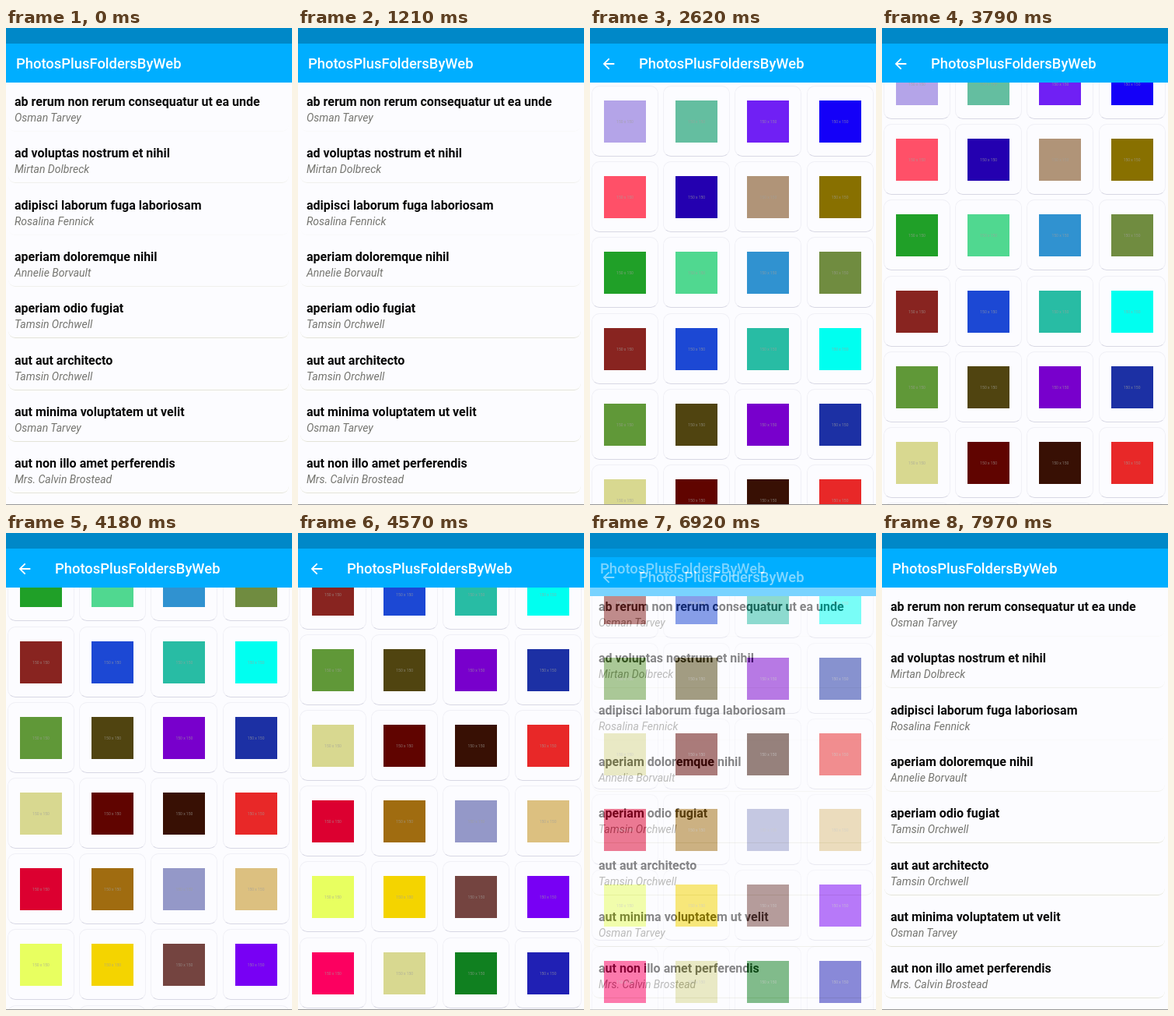
An HTML page for the animation above (8000 ms loop, 368 px wide and 612 px high).

```html
<!DOCTYPE html>
<html lang="en">
<head>
<meta charset="utf-8">
<title>Album browser</title>
<style>
  html, body { margin: 0; width: 100%; height: 100%; overflow: hidden; }
  body { position: relative; font-family: Roboto, "Open Sans", sans-serif; }
  div, svg { position: absolute; box-sizing: border-box; white-space: nowrap; }
  .screen { left: 0; top: 0; width: 368px; height: 612px; overflow: hidden; background: #fcfcff; }
  .status { width: 100%; height: 20px; background: #0088c8; }
  .bar { top: 20px; width: 100%; height: 50px; background: #00aeff; color: #fff;
         font: 500 18.4px/52px Roboto, sans-serif; }
  .bar svg { left: 13px; top: 15px; width: 22px; height: 22px; fill: #fff; }
  .edge { top: 611px; width: 100%; height: 1px; background: #999; }
  .row { left: 3px; width: 361px; height: 62px; border-radius: 9px; border-bottom: 1px solid; }
  .row div { left: 8px; }
  .title { top: 14px; font: 700 16px/20px Roboto, sans-serif; color: #080808; }
  .author { top: 35px; font: italic 14px/18px Roboto, sans-serif; color: #757570; }
  .view { top: 70px; width: 100%; height: 541px; overflow: hidden; }
  .card { width: 86px; height: 91px; border: 1px solid #f0f0f6; border-bottom-color: #d8d8e4;
          border-radius: 10px; background: #fcfcff; }
  .photo { left: 15px; top: 18px; width: 54px; height: 54px; text-align: center;
           font: 5px/54px Roboto, sans-serif; color: rgba(160, 160, 155, .7); }
</style>
</head>
<body>
<div class="screen" id="list"></div>
<div class="screen" id="gallery"></div>
<script>
const LOOP = 8000;
const appName = "PhotosPlusFoldersByWeb";
const albums = [
  ["ab rerum non rerum consequatur ut ea unde", "Osman Tarvey"],
  ["ad voluptas nostrum et nihil", "Mirtan Dolbreck"],
  ["adipisci laborum fuga laboriosam", "Rosalina Fennick"],
  ["aperiam doloremque nihil", "Annelie Borvault"],
  ["aperiam odio fugiat", "Tamsin Orchwell"],
  ["aut aut architecto", "Tamsin Orchwell"],
  ["aut minima voluptatem ut velit", "Osman Tarvey"],
  ["aut non illo amet perferendis", "Mrs. Calvin Brostead"]
];
const colors = `b4a4e8 64bea0 7020f4 1400f8  ff5068 2400b0 b09478 887000
  20a028 50d890 3092d0 708c40  882420 1c48d4 28bca4 00fff0
  609838 504410 7800cc 1c30a4  d8d890 600400 381004 e82828
  dc0030 a06c10 9498c8 dcc080  e8ff60 f4d400 744440 7800f4
  fc0060 d8d890 108020 2020b4`.split(/\s+/);

const list = document.getElementById("list");
const gallery = document.getElementById("gallery");

function add(parent, cls, text = "", style = {}) {
  const el = document.createElement("div");
  el.className = cls;
  el.textContent = text;
  Object.assign(el.style, style);
  return parent.appendChild(el);
}

function addChrome(screen, titleX) {
  add(screen, "status");
  const bar = add(screen, "bar");
  add(bar, "", appName, { left: titleX + "px" });
  add(screen, "edge");
  return bar;
}

addChrome(list, 13);
albums.forEach(([title, author], i) => {
  const line = i > 3 ? "#e4e4d8" : i % 2 ? "#f0f0ec" : "#f9f9fa";
  const row = add(list, "row", "", { top: 71 + i * 66.35 + "px", borderBottomColor: line });
  add(row, "title", title);
  add(row, "author", author);
});

addChrome(gallery, 63).insertAdjacentHTML("beforeend",
  '<svg viewBox="0 0 24 24"><path d="M20 11H7.8l5.6-5.6L12 4l-8 8 8 8 1.4-1.4L7.8 13H20z"/></svg>');
const view = add(gallery, "view");
const grid = add(view, "");
const photos = colors.map((color, i) => {
  const card = add(grid, "card", "", {
    left: 2 + (i % 4) * 92.2 + "px",
    top: 4 + Math.floor(i / 4) * 97.2 + "px"
  });
  return add(card, "photo", "150 x 150", { background: "#" + color });
});

const progress = (t, start, length) => Math.min(1, Math.max(0, (t - start) / length));

// Drag up, steady pull, then coast to rest.
function scrollAt(t) {
  const coast = 1 - progress(t, 4180, 350);
  return 47 * progress(t, 3605, 185) ** 2
    + 198 * progress(t, 3790, 390)
    + 88 * (1 - coast ** 2);
}

function draw(t) {
  const enter = progress(t, 1650, 350);
  const leave = progress(t, 6800, 250);
  const shift = 49 * ((1 - enter) ** 2 + leave ** 2);
  gallery.style.opacity = progress(t, 1650, 200) * (1 - leave);
  gallery.style.transform = `translateY(${Math.round(shift)}px)`;
  grid.style.transform = `translateY(${-Math.round(scrollAt(t))}px)`;
  photos.forEach((photo, i) => {
    photo.style.visibility = t >= 2130 + i * 14 ? "inherit" : "hidden";
  });
}

function tick() {
  draw(performance.now() % LOOP);
  requestAnimationFrame(tick);
}
tick();
</script>
</body>
</html>
```
